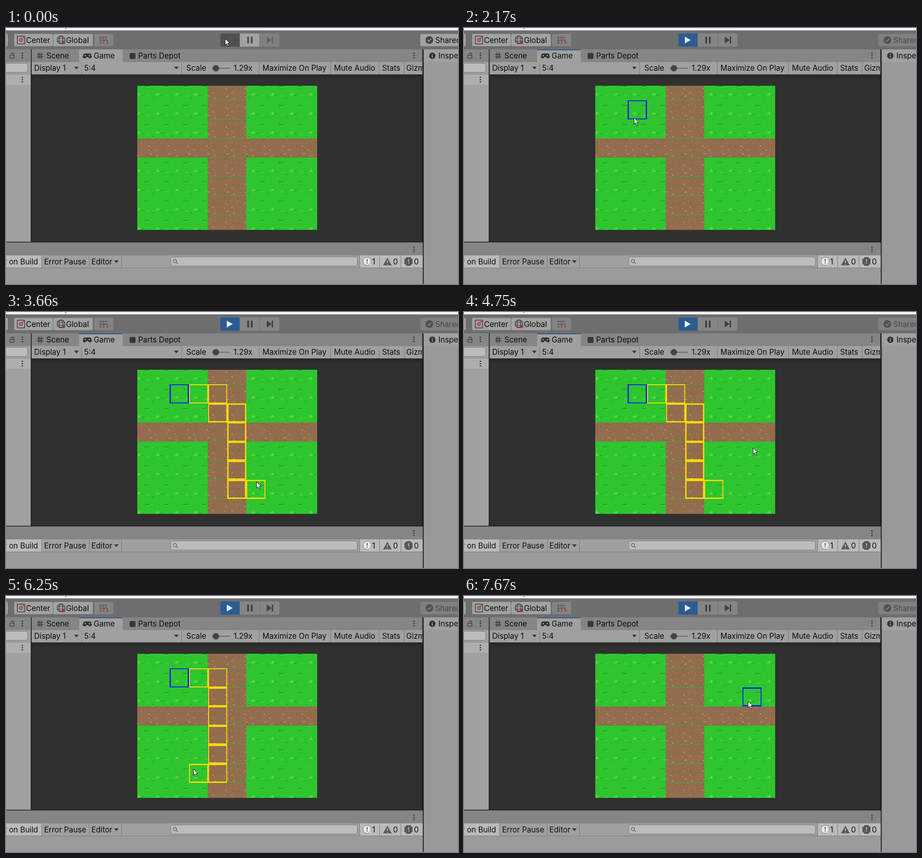
Write an HTML page with a canvas that moves like this. It is 995 px wide and 563 px high and loops after 8 s.

```html
<!DOCTYPE html>
<html lang="en">
<head>
<meta charset="utf-8">
<title>Grid path preview</title>
<style>
  html, body { margin: 0; width: 100%; height: 100%; overflow: hidden; background: #9b9b9b; }
  canvas { display: block; }
</style>
</head>
<body>
<canvas id="stage" width="995" height="563"></canvas>
<script>
const LOOP = 8000, TILE = 42.12, X0 = 360.4, Y0 = 158.7;
const INK = '#0b0b0b', PANEL = '#a0a0a0', BAR = '#858585', BUTTON = '#a2a2a2', DIM = '#464646';
const FIELD = '#bcbcbc', CHECKED = '#bababa', GAP = '#1c1c1c', BADGE = '#585858', BLUE = '#0a28f0';
const canvas = document.getElementById('stage');
let g = canvas.getContext('2d');

// time, cursor x, cursor y, route from the start tile
const steps = [
  [0, 482, 23, ''],
  [1150, 430, 100, ''],
  [1300, 406, 132, ''],
  [1420, 387, 165, ''],
  [1540, 376, 191, ''],
  [1930, 375, 194, ''],
  [2170, 374, 197, ''],
  [2450, 374, 249, 'DD'],
  [2600, 374, 275, 'DD'],
  [2750, 374, 306, 'DDD'],
  [2870, 376, 345, 'DDDD'],
  [2990, 378, 380, 'DDDDD'],
  [3270, 454, 373, 'DDDDD'],
  [3390, 526, 376, 'DDRRDDD'],
  [3540, 545, 374, 'RRDRDDDD'],
  [3660, 551, 373, 'RRDRDDDDR'],
  [4090, 569, 372, 'RRDRDDDDR'],
  [4360, 592, 365, 'RRDRDDDDR'],
  [4510, 610, 344, 'RRDRDDDDR'],
  [4630, 626, 317, 'RRDRDDDDR'],
  [4750, 636, 298, 'RRDRDDDDR'],
  [4900, 626, 266, 'RRRDDRRRD'],
  [5050, 600, 250, 'DDRRRRR'],
  [5200, 594, 251, 'DDRRRRR'],
  [5350, 560, 250, 'DDRRRR'],
  [5470, 522, 254, 'RRDRD'],
  [5590, 498, 258, 'RRDRD'],
  [5740, 475, 263, 'RRDD'],
  [5860, 462, 266, 'RRDD'],
  [6010, 450, 306, 'RRDDD'],
  [6130, 432, 350, 'RRDDDD'],
  [6250, 412, 380, 'RRDDDDDL'],
  [6370, 386, 382, 'DDDDD'],
  [6490, 366, 345, 'DDDD'],
  [6610, 346, 312, 'DDDL'],
  [6730, 338, 288, 'DDDL'],
  [6880, 440, 262, 'DDRR'],
  [7000, 535, 250, 'RRDRDR'],
  [7150, 563, 247, 'DDRRRR'],
  [7270, 619, 236, 'RRDRRR'],
  [7420, 625, 231, 'RRDRDRRRU'],
  [7670, 625, 231, '']
];

function rect(x, y, w, h, color) {
  g.fillStyle = color;
  g.fillRect(x, y, w, h);
}
function round(x, y, w, h, r, color, edge) {
  g.beginPath();
  g.roundRect(x, y, w, h, r);
  g.fillStyle = color;
  g.fill();
  if (edge) { g.strokeStyle = edge; g.lineWidth = 1; g.stroke(); }
}
function disc(x, y, r, color) {
  g.beginPath();
  g.arc(x, y, r, 0, 7);
  g.fillStyle = color;
  g.fill();
}
function ring(x, y, rx, ry, color, w = 1.5) {
  g.beginPath();
  g.ellipse(x, y, rx, ry, 0, 0, 7);
  g.strokeStyle = color;
  g.lineWidth = w;
  g.stroke();
}
function poly(points, color) {
  g.beginPath();
  points.forEach(([x, y]) => g.lineTo(x, y));
  g.closePath();
  g.fillStyle = color;
  g.fill();
}
function line(x1, y1, x2, y2, color, w = 1) {
  g.beginPath();
  g.moveTo(x1, y1);
  g.lineTo(x2, y2);
  g.strokeStyle = color;
  g.lineWidth = w;
  g.stroke();
}
function text(s, x, y, color = INK, align = 'left') {
  g.font = '16.8px Inter, "Open Sans", sans-serif';
  g.textAlign = align;
  g.fillStyle = color;
  g.fillText(s, x, y);
}
const divider = (x, y, h) => rect(x, y, 1, h, '#777');
const arrow = (x, y) => poly([[x - 5, y - 3], [x + 5, y - 3], [x, y + 3]], '#353535');
function dots(x, y) {
  for (let i = -1; i < 2; i++) disc(x, y + i * 5, 1.6, '#333');
}
function check(x, y, color) {
  g.beginPath();
  g.moveTo(x - 4, y);
  g.lineTo(x - 1, y + 3);
  g.lineTo(x + 4, y - 3);
  g.strokeStyle = color;
  g.lineWidth = 2;
  g.stroke();
}

function texel(col, row, x, y, w, h, color) {
  const s = TILE / 32;
  rect(Math.round(X0 + col * TILE + x * s), Math.round(Y0 + row * TILE + y * s),
       Math.max(1, Math.round(w * s)), Math.max(1, Math.round(h * s)), color);
}
function tuft(col, row, x, y, color) {
  texel(col, row, x, y + 2, 6, 1, color);
  for (let i = 0; i < 3; i++) texel(col, row, x + i * 3, y + i % 2, 1, 2, color);
}
function grass(col, row) {
  const dark = '#1d8a24', light = '#5fe03c';
  tuft(col, row, 23, 7, dark);
  texel(col, row, 24, 10, 5, 1, light);
  tuft(col, row, 8, 21, light);
  texel(col, row, 11, 20, 2, 3, light);
  texel(col, row, 17, 23, 3, 1, dark);
  texel(col, row, 3, 10, 2, 1, light);
  texel(col, row, 5, 11, 1, 1, dark);
  texel(col, row, 26, 25, 3, 1, light);
  texel(col, row, 29, 23, 1, 2, light);
  texel(col, row, 3, 28, 2, 1, dark);
}

let seed = 29;
const rnd = () => (seed = seed * 16807 % 2147483647) / 2147483647;
const specks = Array.from({ length: 34 }, (_, i) => ({
  x: rnd() * 31 | 0, y: rnd() * 31 | 0, w: 1 + rnd() * 1.4 | 0,
  color: ['#dcbd9a', '#6e4a30', '#c8964f', '#7d5a3c'][i % 4]
}));
function dirt(col, row) {
  specks.forEach(p => texel(col, row, p.x, p.y, p.w, 1, p.color));
}

function drawField() {
  g.save();
  g.beginPath();
  g.rect(289, 127, 396, 317);
  g.clip();
  rect(289, 127, 396, 317, '#2ec52f');
  rect(444, 127, 85, 317, '#926d4e');
  rect(289, 243, 396, 42, '#926d4e');
  for (let row = -1; row < 7; row++)
    for (let col = -2; col < 8; col++)
      (row === 2 || col === 2 || col === 3 ? dirt : grass)(col, row);
  for (let row = 0; row < 7; row++)
    rect(445, Math.round(Y0 + row * TILE) - 1, 84, 1.5, '#4aa03c');
  g.restore();
}

function drawToolbar() {
  rect(0, 0, 995, 47, '#6e6e6e');
  rect(0, 0, 995, 5, '#f4f4f4');
  rect(0, 5, 995, 1, '#8a8a8a');
  rect(130, 0, 3, 1, '#333');
  round(-8, 13, 12, 27, 3, BUTTON);
  round(18, 13, 85, 27, 3, BUTTON);
  round(104, 13, 87, 27, 3, BUTTON);
  round(194, 13, 42, 27, 3, '#838383');

  g.strokeStyle = '#333';
  g.lineWidth = 1.4;
  g.strokeRect(25, 18, 16, 17);
  ring(33, 26.5, 3, 3, '#b12a25', 1.8);
  line(35, 24, 41, 18, '#b12a25', 1.5);
  text('Center', 44, 32.5);

  ring(121, 26, 8.5, 8.5, '#333');
  ring(121, 26, 4, 8.5, '#333', 1.2);
  line(113, 23, 129, 23, '#333');
  line(113, 29, 129, 29, '#333');
  ring(127, 32, 2.5, 2.5, '#b12a25', 2);
  text('Global', 132, 32.5);

  for (const d of [0, 6, 12]) {
    line(208 + d, 18, 208 + d, 34 - d, '#5b5b5b', 1.5);
    line(205, 21 + d, 223 - d, 21 + d, '#5b5b5b', 1.5);
  }
  g.beginPath();
  g.arc(219, 30, 4, Math.PI, 0);
  g.lineTo(223, 35);
  g.moveTo(215, 30);
  g.lineTo(215, 35);
  g.strokeStyle = '#8b4846';
  g.lineWidth = 2.5;
  g.stroke();
}

function drawSides() {
  rect(0, 47, 54.5, 423.5, PANEL);
  rect(0, 47, 54.5, 28, BAR);
  g.strokeStyle = '#444';
  g.lineWidth = 1.6;
  g.strokeRect(8.5, 60, 9, 6.5);
  g.beginPath();
  g.arc(14, 58, 3, Math.PI, 0);
  g.lineTo(17, 60);
  g.stroke();
  dots(36, 60.5);
  round(-10, 77.5, 58, 20, 5, FIELD, '#777');
  rect(0, 101, 54, 1, '#858585');
  rect(0, 102, 54, 23, '#aeaeae');
  dots(36, 113.5);

  rect(919.5, 47, 76, 516, '#999');
  rect(919.5, 47, 76, 28, PANEL);
  disc(938.5, 61, 7, '#333');
  rect(937.5, 60, 2, 5, PANEL);
  rect(937.5, 57, 2, 2, PANEL);
  text('Inspector', 952, 67);
}

function drawView() {
  rect(56.5, 47, 860, 28, BAR);
  rect(161, 47, 96, 28, PANEL);
  for (const d of [0, 5]) {
    line(72.5 + d, 54, 72.5 + d, 68, '#333', 1.6);
    line(68, 58.5 + d, 82, 58.5 + d, '#333', 1.6);
  }
  text('Scene', 89, 67);
  round(170, 56, 18, 8, 4, '#333');
  disc(173, 63, 3.8, '#333');
  disc(185, 63, 3.8, '#333');
  disc(174.5, 60.5, 1.6, PANEL);
  disc(183.5, 60.5, 1.6, PANEL);
  text('Game', 193, 67);
  round(272, 55, 13, 13, 2, '#383838');
  text('Parts Depot', 291, 67);
  dots(898, 60.5);

  rect(56.5, 75, 860, 27, PANEL);
  text('Display 1', 62, 94);
  arrow(155, 88);
  text('5:4', 172, 94);
  arrow(375, 88);
  text('Scale', 397, 93.5);
  rect(453, 87.5, 40, 2, '#686868');
  disc(462, 88.5, 7, '#444');
  text('1.29x', 501, 93.5);
  text('Maximize On Play', 564.5, 94);
  text('Mute Audio', 722, 94);
  text('Stats', 828, 94);
  g.save();
  g.beginPath();
  g.rect(56, 75, 860, 27);
  g.clip();
  text('Gizmos', 881, 94);
  g.restore();
  [166, 386, 557, 714, 821, 876].forEach(x => divider(x, 75, 27));

  rect(56.5, 102, 860, 368.5, '#292929');
  round(57, 110, 858, 360, [7, 7, 0, 0], '#303030', '#2b2b2b');
  drawField();
}

function drawConsoleBase() {
  rect(0, 470, 917.5, 1.5, GAP);
  rect(0, 471.5, 917.5, 28.5, BAR);
  dots(898, 486.5);
  rect(0, 500, 917.5, 28, PANEL);
  rect(0, 528, 917.5, 35, '#9b9b9b');
  rect(0, 500, 78, 27, CHECKED);
  rect(0, 527, 917, 1, '#7b7b7b');
  text('Clear on Build', 70.5, 520, INK, 'right');
  text('Error Pause', 84, 520);
  text('Editor', 188, 520);
  arrow(243, 514);
  [78, 183, 254].forEach(x => divider(x, 500, 27));
}

function bang(x, y, color) {
  rect(x - 1, y - 5, 2, 6, color);
  rect(x - 1, y + 3, 2, 2, color);
}
function drawCounters(count) {
  const dx = count ? 0 : -3;
  round(362.5 + dx, 503.5, 411, 20, 5, FIELD, '#747474');
  ring(372 + dx, 512.5, 3.5, 3.5, '#555', 1.3);
  line(375 + dx, 515.5, 378 + dx, 518.5, '#555', 1.5);

  rect(778 + dx, 500, 139 - dx, 27, CHECKED);
  [778 + dx, 822, 869].forEach(x => divider(x, 500, 27));
  const bubble = count ? '#e6e6e6' : BADGE;
  disc(795 + dx, 513, 9, bubble);
  poly([[796 + dx, 520], [803 + dx, 516], [802 + dx, 523]], bubble);
  if (count) ring(795, 513, 9, 9, '#777', 1);
  bang(795 + dx, 513, count ? '#555' : CHECKED);
  text(count, 806, 520);

  poly([[839.5, 505], [849, 522], [830, 522]], BADGE);
  bang(839.5, 516, CHECKED);
  text('0', 852, 520);
  poly([[882, 504], [890, 504], [895, 509], [895, 518], [890, 523], [882, 523], [877, 518], [877, 509]], BADGE);
  bang(886, 513.5, CHECKED);
  text('0', 898, 520);
}

function drawControls(playing) {
  const icon = playing ? '#414141' : '#505050';
  const back = playing ? '#858585' : BUTTON;
  round(472, 12, 42, 29, [3, 0, 0, 3], playing ? '#2b5b93' : '#505050');
  round(515, 12, 43, 29, 0, back);
  round(559, 12, 43, 29, [0, 3, 3, 0], playing ? back : '#808080');
  if (playing) poly([[486, 19], [499, 26.5], [486, 34]], '#f2f2f2');
  rect(531, 19, 4, 15, icon);
  rect(539, 19, 4, 15, icon);
  const next = playing ? '#414141' : '#636363';
  poly([[574, 19], [585, 26.5], [574, 34]], next);
  rect(585, 19, 3, 15, next);

  const share = playing ? '#808080' : BUTTON;
  round(912, 13, 100, 27, 3, share);
  disc(932, 26.5, 8.5, playing ? '#505050' : '#444');
  check(932, 26.5, share);
  text('Shared', 945, 32.5, playing ? DIM : INK);
  if (playing) rect(161, 47, 96, 2, '#2b5b93');
}

function outline(col, row, color) {
  const x = Math.round(X0 + col * TILE), y = Math.round(Y0 + row * TILE);
  const w = Math.round(X0 + (col + 1) * TILE) - x, h = Math.round(Y0 + (row + 1) * TILE) - y;
  const v = col === 0 || col === 3 ? 3 : 2, t = row === 0 || row === 2 ? 2 : 3;
  rect(x, y, w, t, color);
  rect(x, y + h - t, w, t, color);
  rect(x, y, v, h, color);
  rect(x + w - v, y, v, h, color);
}
function drawRoute(route) {
  let col = 0, row = 0;
  for (const d of route) {
    col += (d === 'R') - (d === 'L');
    row += (d === 'D') - (d === 'U');
    outline(col, row, '#ffd800');
  }
}
function drawCursor(x, y) {
  g.save();
  g.translate(x + .5, y + .5);
  g.lineJoin = 'round';
  poly([[0, 0], [0, 14], [3.3, 11], [5.7, 16.5], [8, 15.5], [5.7, 10.2], [10, 10]], '#fff');
  g.strokeStyle = '#111';
  g.lineWidth = 1;
  g.stroke();
  g.restore();
}

// the fixed window is painted once
const base = document.createElement('canvas');
base.width = 995;
base.height = 563;
const screen = g;
g = base.getContext('2d');
rect(0, 0, 995, 563, GAP);
drawToolbar();
drawSides();
drawView();
drawConsoleBase();
g = screen;

function frame(now) {
  const t = now % LOOP;
  const [, x, y, route] = steps.findLast(s => s[0] <= t);
  g.drawImage(base, 0, 0);
  drawControls(t >= 500);
  drawCounters(t >= 620 && t < 1690 ? 0 : 1);
  drawRoute(route);
  if (t >= 7670) outline(6, 1, BLUE);
  else if (t >= 1540) outline(0, 0, BLUE);
  drawCursor(x, y);
  requestAnimationFrame(frame);
}
requestAnimationFrame(frame);
</script>
</body>
</html>
```
